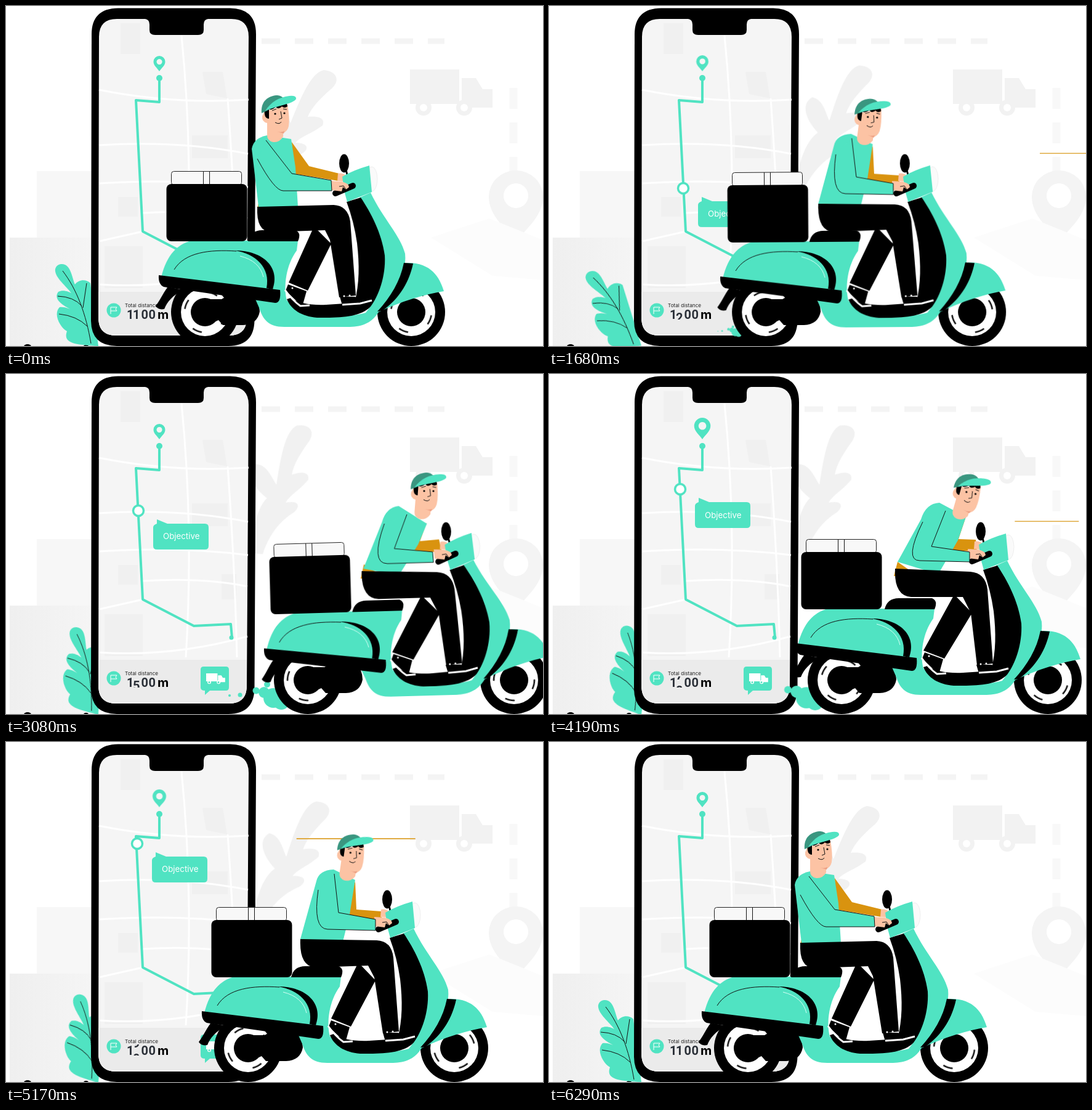
Animation, 872 px wide and 552 px high, one loop 6.36 s. Source, as an HTML page without scripts:

```html
<!DOCTYPE html>
<html lang="en">
<head>
<meta charset="utf-8">
<title>Scooter delivery</title>
<style>
html, body { margin: 0; width: 100%; height: 100%; overflow: hidden; background: #fff }
svg { display: block; width: 872px; height: 552px }
svg * { animation: 6.36s linear infinite }
.teal { fill: #50e3c2 }
.orange { fill: #d9930f }
.skin { fill: #fcc3a4 }
.white { fill: #fff }
.line { fill: none; stroke: #111; stroke-width: 1 }
.route { fill: none; stroke: #50e3c2; stroke-width: 4; stroke-linejoin: round }
.road { fill: none; stroke: #fff; stroke-width: 3 }
text { font-family: Inter, sans-serif }
.digits { font: 700 20px Roboto, sans-serif; fill: #2b3038 }

.ride { animation-name: ride }
@keyframes ride {
  0%, 98.9%, 100% { transform: none }
  11% { transform: translateX(14px) }
  15.4% { transform: translateX(18px) }
  26.4% { transform: translateX(29px) }
  33% { transform: translateX(62px) }
  42.5% { transform: translateX(142px) }
  48.4% { transform: translateX(167px) }
  55% { transform: translateX(172px) }
  65.9% { transform: translateX(152px) }
  73.9% { transform: translateX(113px) }
  81.3% { transform: translateX(70px) }
  89% { transform: translateX(32px) }
  94.3% { transform: translateX(10px) }
}
.tilt { animation-name: tilt; transform-origin: 555px 300px }
@keyframes tilt {
  0%, 18%, 65.9%, 100% { transform: none }
  26.4% { transform: rotate(-.4deg) }
  40%, 48.4% { transform: rotate(-1.6deg) }
}
.box { animation-name: box }
@keyframes box {
  0%, 48.4%, 98.9%, 100% { transform: none }
  65.9% { transform: translateX(-3px) }
  81.3% { transform: translateX(3px) }
}
.spin { animation-name: spin; animation-duration: 1.06s; transform-box: fill-box; transform-origin: center }
@keyframes spin { to { transform: rotate(360deg) } }

.torso { animation-name: torso }
@keyframes torso {
  0%, 14.5%, 98.9%, 100% { d: path("M424 210Q402 214 399 232L410 326L474 326L470 262L463 216Z") }
  26.4%, 81.3% { d: path("M462 207Q438 208 434 226L408 320L477 324L488 280L497 224Z") }
  48.4% { d: path("M473 212Q452 214 445 238L413 312L470 325L503 275L518 242Z") }
  65.9% { d: path("M482 209Q460 210 452 236L414 305L480 325L512 270L525 232Z") }
}
.sleeve { animation-name: sleeve }
@keyframes sleeve {
  0%, 14.5%, 98.9%, 100% { d: path("M408 248Q436 300 450 300L529 300L528 283L464 272L422 218") }
  26.4%, 81.3% { d: path("M437 240Q428 303 452 304L530 306L530 288L470 277L463 214") }
  48.4% { d: path("M449 240Q424 304 452 305L527 305L526 288L464 281L486 226") }
  65.9% { d: path("M455 240Q424 303 450 303L531 305L531 289L469 280L492 222") }
}
.far-arm { animation-name: far-arm }
@keyframes far-arm {
  0%, 14.5%, 98.9%, 100% { d: path("M464 221L492 260L541 272L540 284L466 272Z") }
  26.4%, 81.3% { d: path("M497 226L499 272L540 275L540 289L480 283Z") }
  48.4% { d: path("M518 240L506 270L537 268L541 288L490 288Z") }
  65.9% { d: path("M525 232L513 268L541 269L543 288L490 286Z") }
}
.pants { animation-name: pants }
@keyframes pants {
  0%, 14.5%, 98.9%, 100% { d: path("M500 358L528 386L490 462L459 449ZM408 326L532 323Q555 324 559 350L568 470L541 473L526 380L518 364L430 367Q406 366 408 326Z") }
  26.4%, 81.3% { d: path("M502 358L530 387L490 462L458 449ZM408 320L532 322Q556 323 559 350L568 470L542 473L528 382L518 363L432 366Q406 364 408 320Z") }
  48.4%, 65.9% { d: path("M506 358L535 388L490 462L456 449ZM410 316L532 321Q557 323 560 350L569 470L543 473L533 388L520 362L436 362Q408 360 410 316Z") }
}
.head { animation-name: head; transform-origin: 440px 185px }
@keyframes head {
  0%, 14.5%, 98.9%, 100% { transform: translate(0, 0) rotate(0deg) }
  26.4%, 81.3% { transform: translate(51px, 5px) rotate(8deg) }
  48.4% { transform: translate(77px, 14px) rotate(6deg) }
  65.9% { transform: translate(86px, 17px) rotate(16deg) }
}
.puffs { animation-name: puffs; transform-origin: 278px 532px }
@keyframes puffs {
  0%, 22%, 74%, 100% { transform: scale(0) }
  26.4% { transform: scale(.4) }
  45%, 48.4% { transform: scale(1) }
  65.9% { transform: scale(1.08) }
}
.wisp { animation-name: wisp }
@keyframes wisp {
  0%, 50%, 100% { opacity: 1 }
  56%, 75% { opacity: 0 }
}
.plant { animation-name: plant; transform-origin: 145px 552px }
@keyframes plant {
  0%, 98.9%, 100% { transform: none }
  11% { transform: rotate(-14deg) }
  15.4% { transform: rotate(-15deg) }
  20% { transform: rotate(-14deg) }
  26.4% { transform: rotate(-10deg) }
  34% { transform: rotate(-4deg) }
  48.4% { transform: rotate(10.5deg) }
  57% { transform: rotate(15deg) }
  65.9% { transform: rotate(16deg) }
  73% { transform: rotate(16deg) }
  81.3% { transform: rotate(13deg) }
  90% { transform: rotate(6deg) }
}
.shade { animation-name: shade; transform-origin: 405px 285px }
@keyframes shade {
  0%, 15%, 98%, 100% { transform: none }
  26.4%, 81.3% { transform: rotate(-4deg) }
  48.4%, 65.9% { transform: rotate(-13deg) }
}
.pin { animation-name: pin; transform-origin: 249px 106px }
@keyframes pin {
  0%, 44%, 53%, 98.9%, 100% { transform: scale(1) }
  8% { transform: scale(1.3) }
  15.4% { transform: scale(.92) }
  20% { transform: scale(1.3) }
  26.4% { transform: scale(1.04) }
  31% { transform: scale(1.35) }
  37% { transform: scale(1.1) }
  65.9% { transform: scale(1.4) }
  70% { transform: scale(1.5) }
  81.3% { transform: scale(1.16) }
}
.marker { animation-name: climb, marker }
.bubble { animation-name: climb, bubble }
@keyframes climb {
  0% { transform: translate(5px, 112px) }
  15.4% { transform: translate(4px, 94px) }
  26.4% { transform: translate(3px, 74px) }
  37% { transform: translate(2px, 36px) }
  48.4% { transform: none }
  65.9% { transform: translate(-2px, -35px) }
  81.3% { transform: translate(-2px, -57px) }
  100% { transform: translate(-3px, -66px) }
}
@keyframes marker {
  0%, 9%, 93%, 100% { opacity: 0 }
  14%, 87% { opacity: 1 }
}
@keyframes bubble {
  0%, 12.5%, 93%, 100% { opacity: 0 }
  15.4% { opacity: .35 }
  20%, 87% { opacity: 1 }
}
.roll { animation-name: roll }
@keyframes roll {
  0%, 16% { transform: none }
  26.4% { transform: translateY(-20px) }
  48.4% { transform: translateY(-95px) }
  65.9% { transform: translateY(-162px) }
  81.3% { transform: translateY(-212px) }
  95%, 100% { transform: translateY(-250px) }
}
.dash { fill: #e0ab43; animation-name: dash; animation-delay: var(--at) }
@keyframes dash {
  0% { transform: none }
  15.7%, 100% { transform: translateX(-700px) }
}
</style>
</head>
<body>
<svg viewBox="0 0 872 552">
  <defs>
    <clipPath id="window"><rect x="205" y="491" width="13" height="18"/></clipPath>
    <linearGradient id="fade">
      <stop stop-color="#efefef"/><stop offset="1" stop-color="#f5f5f5"/>
    </linearGradient>
    <g id="wheel">
      <circle r="55"/>
      <circle r="39" class="white"/>
      <circle class="spin line" r="33" style="stroke-width:2.5" stroke-dasharray="16 35.8" stroke-dashoffset="8"/>
      <circle r="23"/>
    </g>
    <g id="truck">
      <path d="M0 0H80V56H0ZM84 14H107L118 32H134V62H84Z"/>
      <circle cx="22" cy="62" r="13"/><circle cx="88" cy="62" r="13"/>
    </g>
  </defs>

  <!-- pale scenery -->
  <g fill="#f7f7f7">
    <path d="M415 57H712" stroke="#f4f4f4" stroke-width="9" stroke-dasharray="30 24" fill="none"/>
    <path d="M824 133V290" stroke="#f8f8f8" stroke-width="13" stroke-dasharray="34 22" fill="none"/>
    <use href="#truck" x="656" y="103" fill="#f2f2f2"/>
    <circle cx="678" cy="165" r="6" class="white"/><circle cx="744" cy="165" r="6" class="white"/>
    <path fill-rule="evenodd" fill="#f4f4f4" d="M828 382C812 362 784 340 784 310A44 43 0 0 1 872 310C872 340 845 362 828 382ZM828 288a20 20 0 1 0 .1 0Z"/>
    <path d="M690 376L785 345L872 380V445L790 438Z" fill="#fcfcfc"/>
    <path d="M50 268H140V376H50Z"/>
    <path d="M6 376H145V552H6Z" fill="url(#fade)"/>
    <path class="shade" fill="#f1f1f1" d="M400 290C412 235 430 215 442 208C420 180 420 158 437 150C455 155 457 178 462 190C478 150 495 108 516 104C537 106 543 120 530 133C510 150 496 165 490 180C510 178 519 184 514 194C495 208 478 212 470 222C490 222 494 232 480 240C450 250 430 270 415 295Z"/>
  </g>
  <rect class="dash" style="--at:-6.193s" x="872" y="156" width="193" height="2"/>
  <rect class="dash" style="--at:-1.76s" x="872" y="156" width="193" height="2"/>
  <rect class="dash" style="--at:-4.786s" x="872" y="238.5" width="104" height="1.5"/>
  <rect class="dash" style="--at:-2.334s" x="872" y="238.5" width="104" height="1.5"/>
  <rect class="dash" style="--at:-.92s" x="872" y="238.5" width="104" height="1.5"/>

  <ellipse cx="35" cy="553" rx="6" ry="4"/><ellipse cx="130" cy="553" rx="4" ry="3"/>
  <g class="plant">
    <path class="teal" d="M91 419C105 419 107 440 112 452C118 444 130 443 137 450L150 552C112 550 92 548 99 528C88 522 76 500 87 489C96 488 104 492 108 494C92 486 76 476 85 464C93 460 102 464 106 466C98 455 78 440 80 427C82 420 87 419 91 419Z"/>
    <path class="line" d="M92 430C115 460 130 500 138 548M84 471Q110 472 123 487M86 500Q115 503 132 520M131 450L125 490"/>
  </g>

  <!-- phone -->
  <path d="M182 3.500H364Q406 4 406 46L403.500 510Q403 552 361 552H180Q138 552 138 510L139 46Q139 4 182 3.500Z"/>
  <path fill="#f5f5f5" d="M180 21H226Q233 22 233 30V39Q233 47 242 47H312Q321 47 321 39V30Q321 22 328 21H366Q394 21 394 50L391 506Q391 535 362 535H179Q150 535 150 506L151 50Q151 21 180 21Z"/>
  <path fill="#f0f0f0" d="M186 28H218V78H186ZM319 107H352L359 150L325 143ZM302 210H360V247H302ZM182 310H214V342H182ZM350 325H374V366H350ZM160 390H222V458H160Z"/>
  <path class="road" d="M151 136Q270 160 394 152M151 226Q280 218 393 240M151 288Q280 280 393 294M222 336Q320 330 392 345M151 452Q270 460 392 426M285 48Q305 250 292 460M360 150Q372 320 375 460M151 382L222 366"/>
  <path fill="#ebebeb" d="M150 464H391V506Q391 535 362 535H179Q150 535 150 506Z"/>
  <path class="route" d="M249 117V156L211 153L222 366L305 409L365 406L367 428"/>
  <circle class="teal" cx="249" cy="117" r="5"/><circle class="teal" cx="366" cy="428" r="3.5"/>
  <path class="pin teal" fill-rule="evenodd" d="M249 106C246 101 239.500 97 239.500 90.500A9.500 9.500 0 0 1 258.500 90.500C258.500 97 252 101 249 106ZM249 86a4.500 4.500 0 1 0 .1 0Z"/>
  <circle class="marker" cx="215" cy="222" r="8.500" fill="#fff" stroke="#50e3c2" stroke-width="3.500"/>
  <g class="bubble">
    <path class="teal" d="M245 236L262 243H323Q329 243 329 249V279Q329 285 323 285H245Q239 285 239 279V249Q239 245 245 243Z"/>
    <text x="255" y="268.500" font-size="13.300" fill="#fff">Objective</text>
  </g>
  <circle class="teal" cx="175" cy="494" r="11.500"/>
  <path d="M170 500V489H180L178 492L180 495H170" fill="none" stroke="#fff"/>
  <text x="193" y="489" font-size="8.200" fill="#222">Total distance</text>
  <text class="digits" x="196 219.500 231.500" y="508">100</text>
  <g clip-path="url(#window)">
    <text class="digits roll" x="206 206 206 206 206 206 206 206 206 206 206" y="508 533 558 583 608 633 658 683 708 733 758">12345678901</text>
  </g>
  <text x="246" y="508" font-size="20" font-weight="700">m</text>
  <path class="teal" d="M321 475H357Q362 475 362 480V509Q362 514 357 514H331L323 521V514Q316 514 316 509V480Q316 475 321 475Z"/>
  <use href="#truck" class="white" transform="translate(325 486) scale(.23)"/>
  <g class="teal"><circle cx="330" cy="500.500" r="1.500"/><circle cx="345" cy="500.500" r="1.500"/></g>

  <!-- scooter and rider -->
  <g class="ride">
    <g class="puffs teal">
      <g class="wisp"><circle cx="196" cy="522" r="2"/><circle cx="213" cy="521" r="3.500"/><circle cx="257" cy="504" r="5"/></g>
      <circle cx="239" cy="514" r="5.500"/><circle cx="252" cy="517" r="9"/><circle cx="267" cy="526" r="16"/><circle cx="280" cy="532" r="13"/>
    </g>
    <use href="#wheel" x="323" y="497"/>
    <path d="M323 476H350L360 470H400Q412 480 412 496Q408 517 385 518H352L345 510L323 520Z"/>
    <use href="#wheel" x="658" y="497"/>

    <g class="tilt">
      <path d="M258 455L288 461C270 470 262 480 257 492Q247 494 243 487C250 478 254 468 262 457Z"/>
      <ellipse cx="594" cy="281" rx="9" ry="20" fill="#fafafa" stroke="#eee"/>
      <path class="teal" d="M252 440C262 402 278 388 300 381H474L472 397C455 420 450 455 456 478L478 496C510 506 560 505 584 498C606 470 616 440 614 405C608 365 590 335 574 311L592 303C612 345 640 372 648 402C652 440 622 480 605 497C592 517 575 521 555 521H452C425 521 417 508 411 490L400 465Z"/>
      <path d="M553 318L576 311C592 335 610 368 615 405C617 440 604 472 592 488C578 503 550 506 520 506H505C480 504 463 493 456 476L462 474C475 483 495 486 520 485L566 482C574 450 574 420 570 385Q565 350 553 318Z"/>
      <path class="teal" d="M650 417C690 416 704 440 711 463C680 468 640 480 605 497C630 470 645 445 650 417Z"/>
      <path d="M646 417L661 418C655 447 640 474 611 495L603 496C625 472 640 447 646 417Z"/>
      <path d="M372 397C418 397 446 425 433 460L423 458C430 425 405 402 372 397Z"/>
      <path class="line" d="M273 428C290 400 330 395 374 398"/>
      <path class="line" style="stroke:#d5fff5" d="M380 406Q412 414 418 440"/>
      <path d="M248 437L445 461Q447 482 437 482L256 456Q247 452 248 437Z"/>
      <path d="M393 382Q397 364 416 364H470Q480 368 474 382Z"/>
      <g class="box">
        <rect x="268.500" y="268.500" width="114" height="22" rx="4" fill="#f8f8f8" stroke="#222"/>
        <path class="line" d="M320.500 269V290M330.500 269V290"/>
        <rect x="260.500" y="289" width="131" height="93" rx="8"/>
      </g>

      <path class="orange" d="M408 328L414 305L450 330Z"/>
      <path class="far-arm orange" d="M464 221L492 260L541 272L540 284L466 272Z"/>
      <path class="skin" d="M539 272Q548 270 554 278L550 285L538 284Z"/>
      <path class="torso teal" d="M424 210Q402 214 399 232L410 326L474 326L470 262L463 216Z"/>

      <g class="head">
        <path class="skin" d="M419 172L457 160Q461 182 459 195Q457 204 450 206V212Q444 222 434 221Q424 219 424 210V190Q415 188 416 179Z"/>
        <path d="M419 166L455 154L457 163Q452 167 448 163Q443 169 438 164Q433 169 427 168V183Q421 183 420 176Z"/>
        <path d="M415 174C413 153 428 145 441 145Q449 146 452 152L424 170Z" fill="#3a9680"/>
        <path class="teal" d="M421 170C430 156 443 148 460 146Q472 145 471 151C465 159 447 160 421 170Z"/>
        <path class="line" d="M446 171L448 182L443 184M437 189Q444 193 447 188M432 170L439 167M450 167L456 168"/>
        <circle cx="437" cy="175" r="1.600"/><circle cx="452" cy="174" r="1.600"/>
        <path d="M440 204Q447 206 452 203L451 207Z" fill="#ec9f83"/>
      </g>

      <path class="pants" d="M500 358L528 386L490 462L459 449ZM408 326L532 323Q555 324 559 350L568 470L541 473L526 380L518 364L430 367Q406 366 408 326Z"/>
      <path d="M458 452L488 463L481 488L454 462ZM542 472H566L592 480L546 486Z"/>
      <path d="M453 461Q465 478 478 487L493 486M546 485L575 483L594 478" fill="none" stroke="#fff" stroke-width="3"/>
      <g class="white"><circle cx="465" cy="458" r="1.500"/><circle cx="549" cy="471" r="1.500"/><circle cx="558" cy="470" r="1.500"/></g>

      <path d="M556 282L551 262" stroke="#000" stroke-width="3"/>
      <ellipse cx="549" cy="255.500" rx="8" ry="15"/>
      <path class="teal" d="M546 277Q565 266 590 259L594 302L554 318L549 300Z"/>
      <path d="M535 304L563 292" stroke="#000" stroke-width="10" stroke-linecap="round"/>
      <path class="skin" d="M528 284L545 285Q557 288 557 294L552 298L547 294L545 301L529 299Z"/>
      <path class="line" d="M541 293L548 292L552 298"/>
      <path class="sleeve teal" stroke="#111" d="M408 248Q436 300 450 300L529 300L528 283L464 272L422 218"/>
    </g>
  </g>
</svg>
</body>
</html>
```
